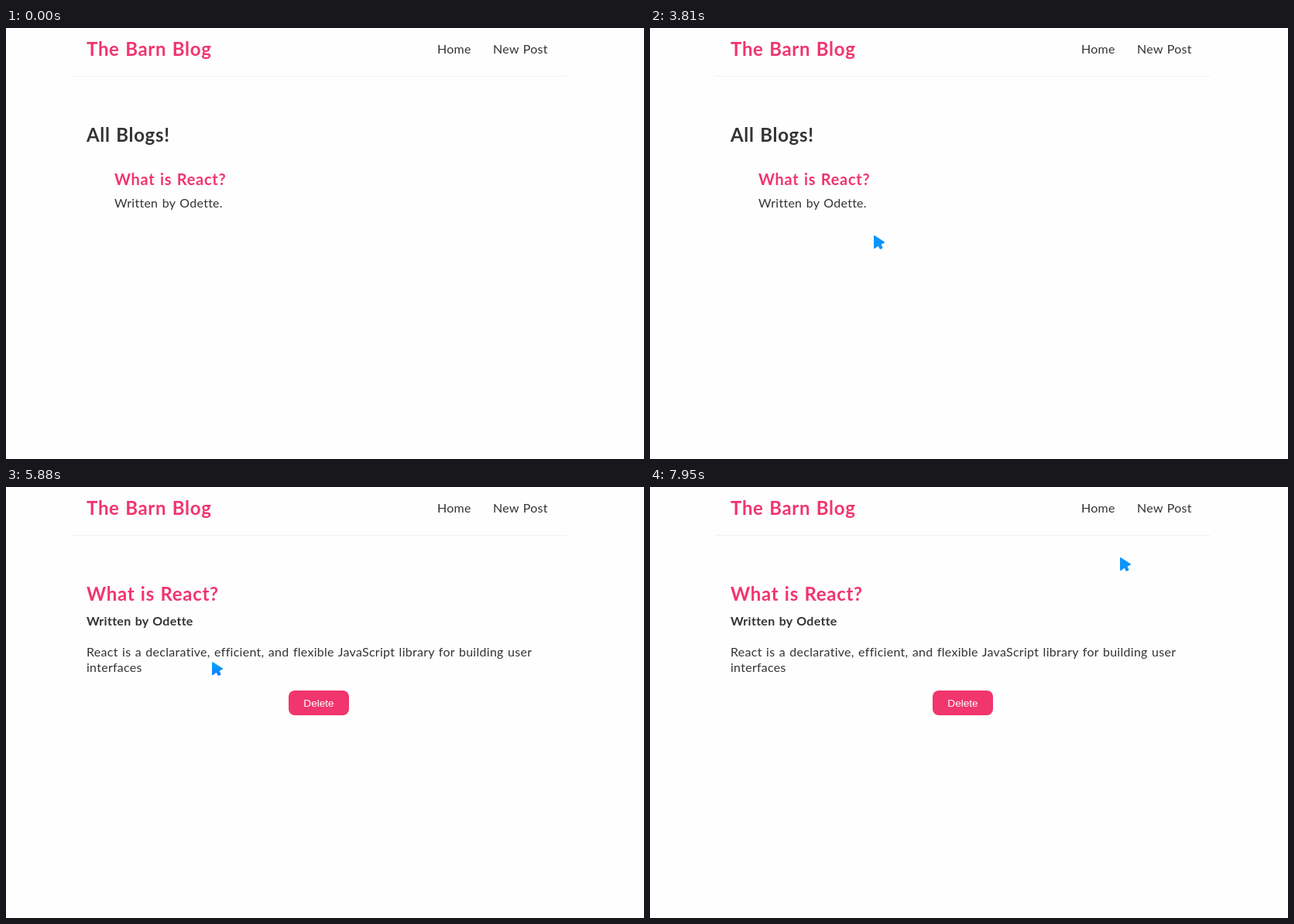
Animation, 824 px wide and 557 px high, one loop 8000 ms. Source, as an HTML page:

```html
<!DOCTYPE html>
<html lang="en">
<head>
<meta charset="utf-8">
<title>Blog</title>
<style>
  html, body { margin: 0; width: 100%; height: 100%; overflow: hidden; background: #fefefe; }
  svg { display: block; width: 100%; height: 100%; }
  text { font: 16px Lato, "Open Sans", sans-serif; letter-spacing: .28px; word-spacing: 1px; fill: #333; }
  .bold { font-weight: 700; }
  .pink { fill: #f1356d; }
  .big { font-size: 24px; font-weight: 700; letter-spacing: .7px; }
  .mid { font-size: 20px; font-weight: 700; letter-spacing: .7px; }
  .button { font: 13.6px "Liberation Sans", Arial, sans-serif; letter-spacing: 0; fill: #fff; text-anchor: middle; }
</style>
</head>
<body>
<svg viewBox="0 0 824 557">
  <defs>
    <filter id="shadow" x="-5%" y="-20%" width="110%" height="150%">
      <feDropShadow dx="1" dy="3" stdDeviation="2.5" flood-color="#000" flood-opacity=".1"/>
    </filter>
    <linearGradient id="glow" x1="0" y1="0" x2="0" y2="1">
      <stop offset="0" stop-color="#0aa6ff"/>
      <stop offset="1" stop-color="#0a7cff"/>
    </linearGradient>
  </defs>

  <g id="header">
    <text class="big pink" x="104" y="36">The Barn Blog</text>
    <text x="557" y="33">Home</text>
    <text x="629" y="33">New Post</text>
    <rect x="84" y="62" width="640" height="1" fill="#f2f2f2"/>
  </g>

  <g id="list">
    <text class="big" x="104" y="147">All Blogs!</text>
    <rect id="card" x="124" y="173" width="560" height="74" fill="#fefefe"/>
    <rect x="124" y="246" width="560" height="1" fill="#f9f9f9"/>
    <text class="mid pink" x="140" y="203">What is React?</text>
    <text x="140" y="232">Written by Odette.</text>
  </g>

  <g id="loading">
    <text x="104" y="139">Loading...</text>
  </g>

  <g id="details">
    <text class="big pink" x="104" y="147">What is React?</text>
    <text class="bold" x="104" y="179">Written by Odette</text>
    <text x="104" y="219">React is a declarative, efficient, and flexible JavaScript library for building user</text>
    <text x="104" y="239">interfaces</text>
    <rect x="365" y="263" width="78" height="32" rx="8" fill="#f1356d"/>
    <text class="button" x="404" y="284">Delete</text>
  </g>

  <path id="cursor" d="M.8 .8L13.2 9L8.6 11.2L10.8 16L8.4 17.2L6 12.6L.8 16.4Z"
        stroke-width="1.5" stroke-linejoin="round"/>
</svg>
<script>
const LOOP = 8000;
const BLINK = { from: 140, to: 230, point: [168, 438] };
const PRESS = { from: 4560, to: 6630 };

const el = id => document.getElementById(id);
const [header, list, loading, details, card, cursor] =
  ["header", "list", "loading", "details", "card", "cursor"].map(el);

function pageAt(t) {
  if (t < 1700) return "list";
  if (t < 1770) return "blank";
  if (t < 2870) return "loading";
  if (t < 4800) return "list";
  return t < 5880 ? "loading" : "details";
}

// Each sweep follows a cubic curve in equal time steps.
const sweeps = [
  { from: 3510, to: 3810, steps: 5, curve: [[97, 283], [230, 282], [270, 274], [289, 268]] },
  { from: 4060, to: 4390, steps: 5, curve: [[287, 264], [283, 252], [268, 228], [266, 226]] },
  { from: 6630, to: 7100, steps: 7, curve: [[246, 229], [62, 240], [373, 229], [346, 251]] },
  { from: 7330, to: 7950, steps: 9, curve: [[352, 253], [470, 275], [694, 8], [607, 91]] }
];

const within = (t, span) => t >= span.from && t < span.to;

function bezier([a, b, c, d], p) {
  const q = 1 - p;
  return [0, 1].map(i =>
    q * q * q * a[i] + 3 * q * q * p * b[i] + 3 * q * p * p * c[i] + p * p * p * d[i]);
}

function cursorAt(t) {
  if (within(t, BLINK)) return BLINK.point;
  const sweep = sweeps.filter(s => s.from <= t).pop();
  if (!sweep) return null;
  const { from, to, steps, curve } = sweep;
  const last = steps - 1;
  const progress = Math.min(1, (t - from) / (to - from));
  return bezier(curve, Math.floor(progress * last) / last).map(Math.round);
}

const show = (node, on) => node.setAttribute("visibility", on ? "visible" : "hidden");

function draw(t) {
  const page = pageAt(t);
  const point = cursorAt(t);

  show(header, page !== "blank");
  show(list, page === "list");
  show(loading, page === "loading");
  show(details, page === "details");

  const hover = point && point[1] > 173 && point[1] < 247;
  card.setAttribute("filter", hover ? "url(#shadow)" : "none");

  show(cursor, point);
  if (point) cursor.setAttribute("transform", `translate(${point})`);
  const paint = within(t, PRESS) ? "url(#glow)" : "#0d94fc";
  cursor.setAttribute("fill", paint);
  cursor.setAttribute("stroke", paint);
}

const start = performance.now();
function tick() {
  draw((performance.now() - start) % LOOP);
  requestAnimationFrame(tick);
}
tick();
</script>
</body>
</html>
```
